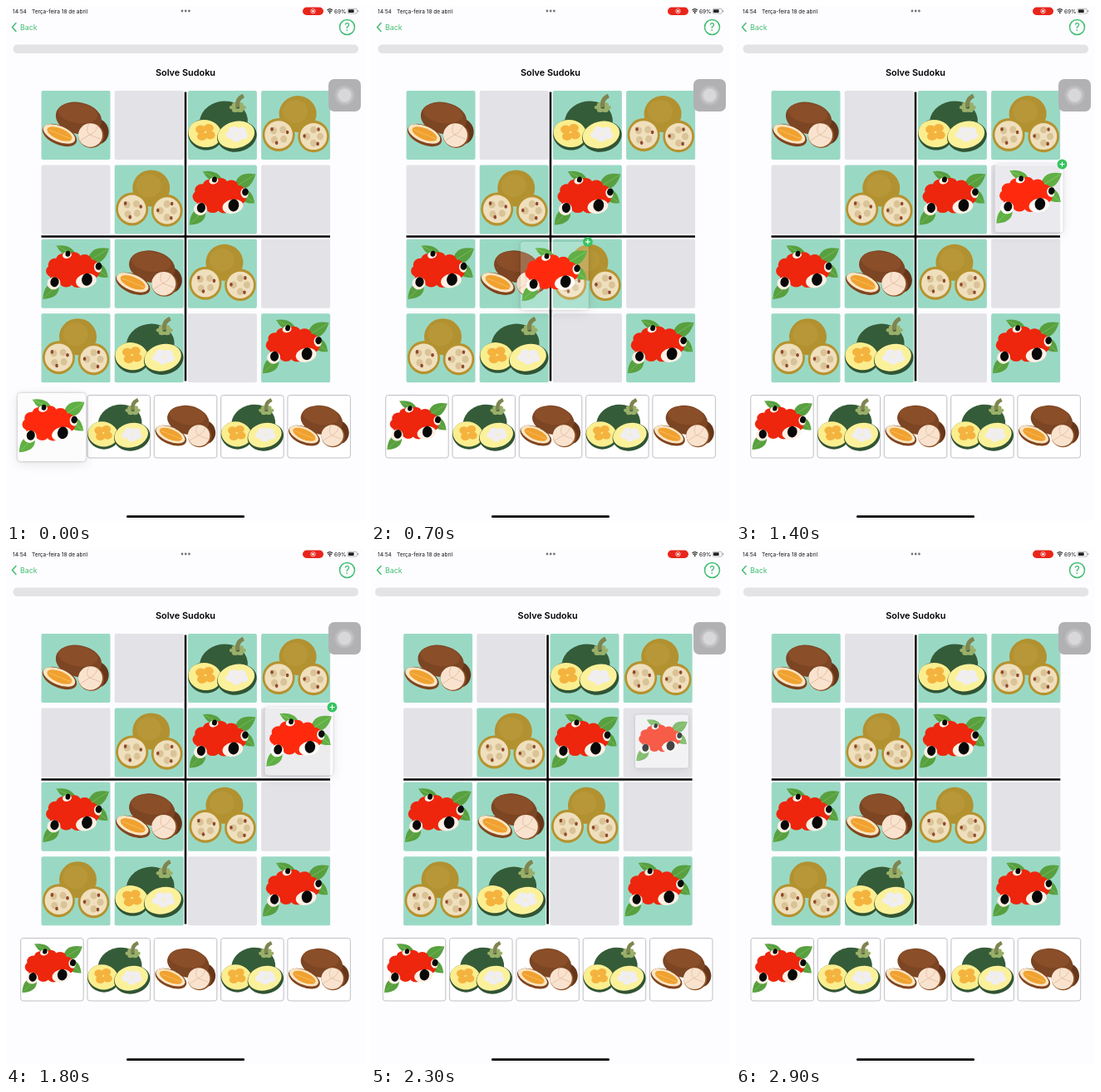
Animation, 432 px wide and 620 px high, one loop 3000 ms. Source, as an HTML page:

```html
<!DOCTYPE html>
<html lang="pt">
<head>
<meta charset="utf-8">
<title>Solve Sudoku</title>
<style>
  html, body { margin: 0; width: 100%; height: 100%; overflow: hidden; background: #fdfcfe; }
  #stage { position: absolute; left: 0; top: 0; font-family: Inter, sans-serif; }
  #drag { position: absolute; left: -41px; top: -41px; width: 82px; height: 82px; border-radius: 4px; }
  #drag svg { position: absolute; left: 0; top: 0; overflow: visible; }
</style>
</head>
<body>
<svg id="stage" width="432" height="620" viewBox="0 0 432 620">
  <defs id="fruits"></defs>
  <g font-size="6.5" fill="#111">
    <text x="8" y="8.5">14:54</text>
    <text x="31" y="8.5">Terça-feira 18 de abril</text>
    <text x="395" y="8.5">69%</text>
  </g>
  <path d="M212 6h9" stroke="#777" stroke-width="2.8" stroke-linecap="round" stroke-dasharray="0 4.2"/>
  <rect x="357" y="1.5" width="25" height="9.5" rx="4.7" fill="#e8251b"/>
  <circle cx="369.5" cy="6.2" r="2.7" fill="none" stroke="#fff" stroke-width=".7"/>
  <circle cx="369.5" cy="6.2" r="1.3" fill="#fff"/>
  <path d="M386.5 5q3.2-2.7 6.400 0M387.6 6.7q2.1-1.7 4.200 0" fill="none" stroke="#222" stroke-width="1.1"/>
  <circle cx="389.7" cy="8.2" r=".9" fill="#222"/>
  <rect x="411" y="3.3" width="11.5" height="5.8" rx="1.7" fill="none" stroke="#888" stroke-width=".6"/>
  <rect x="412" y="4.3" width="6.7" height="3.8" rx=".8" fill="#222"/>
  <path d="M423.8 5.2v2" stroke="#888"/>
  <g fill="none" stroke="#41be73" stroke-width="1.5">
    <path d="M12 20.5l-4.500 5 4.500 5" stroke-linecap="round"/>
    <circle cx="410.5" cy="25.5" r="9"/>
  </g>
  <text x="17" y="28.8" font-size="8.9" fill="#41be73">Back</text>
  <text x="410.5" y="30" font-size="12.5" font-weight="500" text-anchor="middle" fill="#41be73">?</text>
  <g id="board"></g>
  <rect x="388" y="88" width="39" height="39" rx="7" fill="#b1b0b2"/>
  <circle cx="407.5" cy="107.5" r="12" fill="#bbbabc"/>
  <circle cx="407.5" cy="107.5" r="9.8" fill="#c6c5c7"/>
  <circle cx="407.5" cy="107.5" r="7.8" fill="#d8d7d9"/>
  <rect x="145" y="613.3" width="142" height="2.7" rx="1.3"/>
</svg>
<div id="drag">
  <svg width="82" height="82" viewBox="0 0 83 83">
    <use href="#guarana" style="filter: brightness(1.1)"/>
    <g id="plus">
      <circle cx="82" r="6" fill="#35c35f"/>
      <path d="M79 0h6M82-3v6" stroke="#fff" stroke-width="1.2"/>
    </g>
  </svg>
</div>
<script>
const $ = id => document.getElementById(id);
const oval = (x, y, rx, ry, fill, turn = 0) =>
  `<ellipse cx="${x}" cy="${y}" rx="${rx}" ry="${ry}" fill="${fill}" transform="rotate(${turn} ${x} ${y})"/>`;
const shape = (d, fill) => `<path d="${d}" fill="${fill}"/>`;
const line = (d, stroke, width = .6) => `<path d="${d}" fill="none" stroke="${stroke}" stroke-width="${width}"/>`;
// Ovals spread evenly around an ellipse
const ring = (count, x, y, rx, ry, w, h, fill, start = 0) =>
  Array.from({ length: count }, (_, i) => {
    const a = start + i / count * 2 * Math.PI;
    return oval(x + rx * Math.cos(a), y + ry * Math.sin(a), w, h, fill);
  }).join('');

const jenipapoHalf = (x, y, r, start) =>
  oval(x, y, r, r + .5, '#b5922f') + oval(x, y, r - 2.7, r - 2.7, '#efdfbd') +
  ring(4, x, y, 8, 8, 4, 4.3, '#d9c397', start) +
  ring(3, x, y, 11, 10, 1.8, 2.3, '#90492e', start - 1);
const leaf = (x, y, length, width, turn) =>
  `<g transform="translate(${x} ${y}) rotate(${turn})">` +
  shape(`M0 0Q${length * .4} ${-width} ${length} 0Q${length * .4} ${width} 0 0Z`, '#58a03f') +
  line(`M0 0H${length - 2}`, '#86c268') + '</g>';
const eye = (x, y, rx, ry, pupil) =>
  oval(x, y, rx, ry, '#fff0e5', -12) + oval(x + 1, y - 1.5, pupil * .85, pupil, '#080808', 10);

// Drawn on an 83 x 83 tile
const fruits = {
  cupuacu:
    oval(66, 49, 15, 16, '#66361b', -20) +
    oval(45, 33, 28, 19, '#7c4523', 12) + oval(44, 27, 24, 12, '#8a4e28', 8) +
    oval(22, 53.5, 22, 11.5, '#80451f', 23) + oval(21.5, 52, 20.5, 9.5, '#fae5c3', 23) +
    oval(22, 52, 16, 6.7, '#f0a12f', 23) + line('M9 47l27 11', '#f8bc59', 1) +
    oval(60, 54, 15.5, 15, '#8e5327') + oval(59, 53.5, 14.5, 14.2, '#f9e3cf') +
    line('M57 40q-4 9 1 13l-11 7M58 53l13 5M58 53q8-3 9-10', '#dfb99d', .8),
  squash:
    oval(43, 37, 29, 24.5, '#355c38', -8) +
    ring(6, 60, 20, 6, 4, 4, 2.5, '#9ab06a') +
    line('M60 20Q58 10 67 6', '#7f8550', 5) +
    oval(21, 53, 21, 18.5, '#315434', 10) + oval(20.5, 51.5, 20, 16.5, '#fbee8f', 10) +
    ring(4, 21, 50, 7, 6, 6, 5, '#f4b33f', .6) +
    oval(59, 55, 24, 18.5, '#315434', -12) + oval(58, 53, 22.5, 16, '#fbf19b', -14) +
    ring(5, 59, 52, 8, 5, 6, 4.5, '#f0eef0', .4),
  jenipapo:
    oval(44, 28, 22.5, 22, '#b29130') + oval(41, 25, 15, 14, '#b79738') +
    jenipapoHalf(21, 53, 19.5, .7) + jenipapoHalf(63, 55, 18.8, 0),
  guarana:
    leaf(42, 20, 27, 11, 207) + leaf(56, 27, 30, 16, -32) + leaf(61, 30, 25, 14, 40) + leaf(21, 53, 27, 15, 135) +
    oval(38, 38, 26, 16, '#ed260d', -6) +
    ring(11, 38, 37, 24, 14, 8.5, 7.5, '#ed260d', .2) +
    eye(31, 19, 5.5, 4, 3.5) + eye(68, 34, 4.5, 6, 4.5) +
    eye(15, 53, 8, 7.5, 6) + eye(54, 50, 12.5, 8.5, 7.5)
};
$('fruits').innerHTML = Object.entries(fruits).map(([id, art]) => `<g id="${id}">${art}</g>`).join('');

const names = { c: 'cupuacu', s: 'squash', j: 'jenipapo', g: 'guarana' };
const place = (key, x, y, scale = 1) =>
  names[key] ? `<use href="#${names[key]}" transform="translate(${x} ${y}) scale(${scale})"/>` : '';
let board = '<rect x="8.5" y="46.5" width="415.5" height="10.5" rx="5" fill="#e3e2e5"/>' +
  '<text x="216" y="83.5" font-size="10.9" font-weight="600" text-anchor="middle">Solve Sudoku</text>';
[...'c.sj.jg.gcj.js.g'].forEach((key, i) => {
  const x = 42.5 + i % 4 * 88.2, y = 102 + (i >> 2) * 89.4;
  board += `<rect x="${x}" y="${y}" width="83" height="83" rx="2" fill="${names[key] ? '#99d9c4' : '#e3e2e6'}"/>` +
    place(key, x, y);
});
board += line('M216 103.5V451.5M42.5 277.5H390', '#000', 2.5);
[...'gscsc'].forEach((key, i) => {
  const x = 17.7 + i * 80.3;
  board += `<rect x="${x}" y="468.5" width="75.5" height="75.5" rx="3" fill="#fff" stroke="#b9b8c0" stroke-width=".9"/>` +
    place(key, x, 468.5, .91);
});
$('board').innerHTML = board;

const LOOP = 3000, STEP = 100, DROP = 2000, REJECT = 2100;
const ramp = (t, start, end) => Math.min(1, Math.max(0, (t - start) / (end - start)));
const mix = (a, b, k) => a + (b - a) * k;

// Damped sideways swing after the wrong drop
function shake(t) {
  const s = Math.max(0, t - REJECT);
  return -41 * Math.exp(-s * .0061) * Math.sin(2 * Math.PI * s / 440);
}

function draw(now) {
  const t = Math.floor(now % LOOP / STEP) * STEP;
  const travel = ramp(t, 0, 1300), lift = ramp(t, 0, 300), vanish = ramp(t, DROP, 2600);
  const x = mix(55, 352.5, travel * travel * (3 - 2 * travel)) - 2.5 * ramp(t, DROP, 2200);
  const y = mix(507, 231.5, 1 - (1 - travel) ** 1.4);
  const card = mix(1, .15, lift) + .2 * ramp(t, 500, 1800) + .5 * ramp(t, DROP, 2200);

  $('board').setAttribute('transform', `translate(${shake(t)} 0)`);
  $('plus').setAttribute('opacity', t < REJECT ? ramp(t, 400, 600) : 0);
  const style = $('drag').style;
  style.transform = `translate(${x}px, ${y}px) scale(${1 - vanish ** 2.2})`;
  style.opacity = 1 - 1.1 * vanish ** 2;
  style.background = `rgba(252, 252, 253, ${card})`;
  style.boxShadow = `0 0 3px rgba(0, 0, 0, ${.1 + card * .18}), 0 3px 14px rgba(0, 0, 0, .1)`;
  requestAnimationFrame(draw);
}
draw(0);
</script>
</body>
</html>
```
